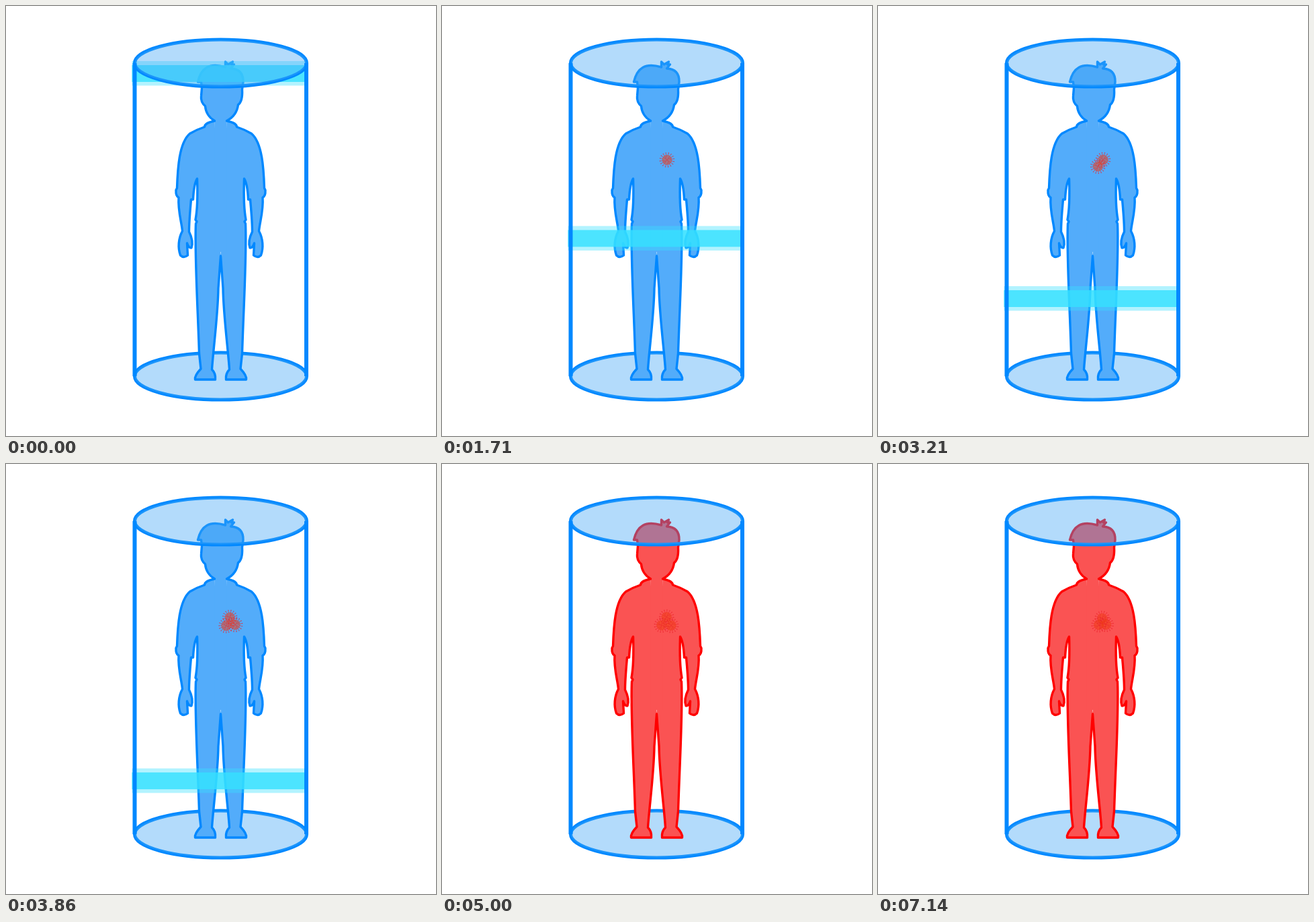
Animation, 640 px wide and 640 px high, one loop 7210 ms. Source, as an HTML page with a canvas:

```html
<!DOCTYPE html>
<html lang="en">
<head>
<meta charset="utf-8">
<title>Body scan</title>
<style>
html, body { margin: 0; height: 100%; overflow: hidden; background: #fff; }
canvas { display: block; }
</style>
</head>
<body>
<canvas id="stage" width="640" height="640"></canvas>
<script>
const ctx = document.getElementById('stage').getContext('2d');
const LOOP = 7210, FPS = 14, TAU = 2 * Math.PI;
const BLUE = '#08f', AXIS = 319.5;
const TURNS = [0, 1180, 2365, 3580, 4792]; // times at which the beam reverses

// Paths are measured from the vertical axis of the body.
const head = `M-9 171 Q-22 163 -23 149 Q-30 143 -29 134 L-28 122 L-29 113 H-34
  C-29 92 -17 84 7 91 V83 L11 87 L18 83 L16 87 H20 L15 93
  Q34 94 33.5 113 L32 124 Q33 142 26 147 Q24 163 9 171`;
const shoulder = 'M9 171 Q24 174 24 180 Q36 184 46 190 C62 204 64 242 65 271';
const arm = 'L66.5 274 Q67 283 62.5 285 C64 305 58 322 57 335';
const hand = 'C63 346 64 360 60 371 Q55 376 49 371 L50 353 Q48 360 43.5 360 Q40 350 47 336';
const side = 'C47 320 45 300 44 288 H41 Q40 265 35 257 C34 285 35 305 37.5 318 L35.5 321';
const leg = `L37 324 C39 370 34 450 32 517 L29.5 540 Q39 550 38 556 H8
  Q7 547 13 541 C11 510 4 460 3.5 420 Q2 400 0 372`;

const half = new Path2D(shoulder + arm + hand + side + leg);
const body = new Path2D(head);
body.addPath(half);
body.addPath(half, new DOMMatrix().scale(-1, 1));

function line(color, width, x1, y1, x2, y2) {
  ctx.strokeStyle = color;
  ctx.lineWidth = width;
  ctx.beginPath();
  ctx.moveTo(x1, y1);
  ctx.lineTo(x2, y2);
  ctx.stroke();
}

function drawLid(y) {
  ctx.beginPath();
  ctx.ellipse(AXIS, y, 128, 35, 0, 0, TAU);
  ctx.strokeStyle = BLUE;
  ctx.lineWidth = 5;
  ctx.stroke();
  ctx.fillStyle = 'rgba(66,165,245,.4)';
  ctx.fill();
}

function drawBody(alarm) {
  ctx.save();
  ctx.translate(AXIS, 0);
  ctx.fillStyle = alarm ? '#fa5353' : '#53acfa';
  ctx.fill(body);
  ctx.fillRect(-9, 170, 18, 196); // joins the two halves and the neck
  ctx.strokeStyle = alarm ? '#f00' : BLUE;
  ctx.lineWidth = 3.4;
  ctx.lineJoin = ctx.lineCap = 'round';
  ctx.stroke(body);
  ctx.restore();
}

function drawVirus(x, y, turn) {
  ctx.save();
  ctx.translate(x, y);
  ctx.rotate(turn);
  ctx.fillStyle = 'rgba(240,64,16,.5)';
  ctx.beginPath();
  ctx.arc(0, 0, 7.5, 0, TAU);
  ctx.fill();
  for (let i = 0; i < 16; i++) {
    ctx.rotate(TAU / 16);
    line('rgba(235,35,45,.7)', 0.7, i % 4 * 2, 0, 10.5, 0);
    ctx.fillStyle = 'rgba(235,35,45,.8)';
    ctx.fillRect(10, -0.6, 1.2, 1.2);
  }
  ctx.restore();
}

// One more virus appears at each of the first three reversals.
function drawViruses(time) {
  for (let i = 0; i < 3; i++) {
    if (time < TURNS[i + 1]) return;
    const place = -TAU / 4 - i * TAU / 3;
    const phase = time / 230 + i * 2.1;
    const x = 334 + 7.3 * Math.cos(place) + Math.sin(phase);
    const y = 236 + 7.3 * Math.sin(place) + Math.cos(phase);
    drawVirus(x, y, Math.sin(phase) / 4);
  }
}

const ease = x => x * x * (3 - 2 * x);

function drawBeam(time) {
  const sweep = TURNS.findIndex(turn => turn > time) - 1;
  const from = TURNS[sweep], to = TURNS[sweep + 1];
  const part = ease((time - from) / (to - from));
  const y = 82 + 428 * (sweep % 2 ? 1 - part : part);
  ctx.fillStyle = 'rgba(53,224,255,.38)';
  ctx.fillRect(187.5, y, 257.5, 36.5);
  ctx.fillStyle = 'rgba(53,224,255,.81)';
  ctx.fillRect(187.5, y + 6, 257.5, 25);
}

function draw(time) {
  const scanning = time < TURNS[4];
  ctx.fillStyle = '#fff';
  ctx.fillRect(0, 0, 640, 640);
  drawLid(551);
  drawBody(!scanning);
  drawViruses(time);
  if (scanning) drawBeam(time);
  drawLid(85);
  for (const x of [-128, 127.5]) line(BLUE, 6, AXIS + x, 85, AXIS + x, 551);
}

const start = performance.now();
function tick() {
  const elapsed = (performance.now() - start) % LOOP;
  // The picture advances in steps of 1/14 s, rounded to 10 ms.
  const step = Math.floor((elapsed + 5) * FPS / 1000);
  draw(step * 1000 / FPS);
  requestAnimationFrame(tick);
}
tick();
</script>
</body>
</html>
```
